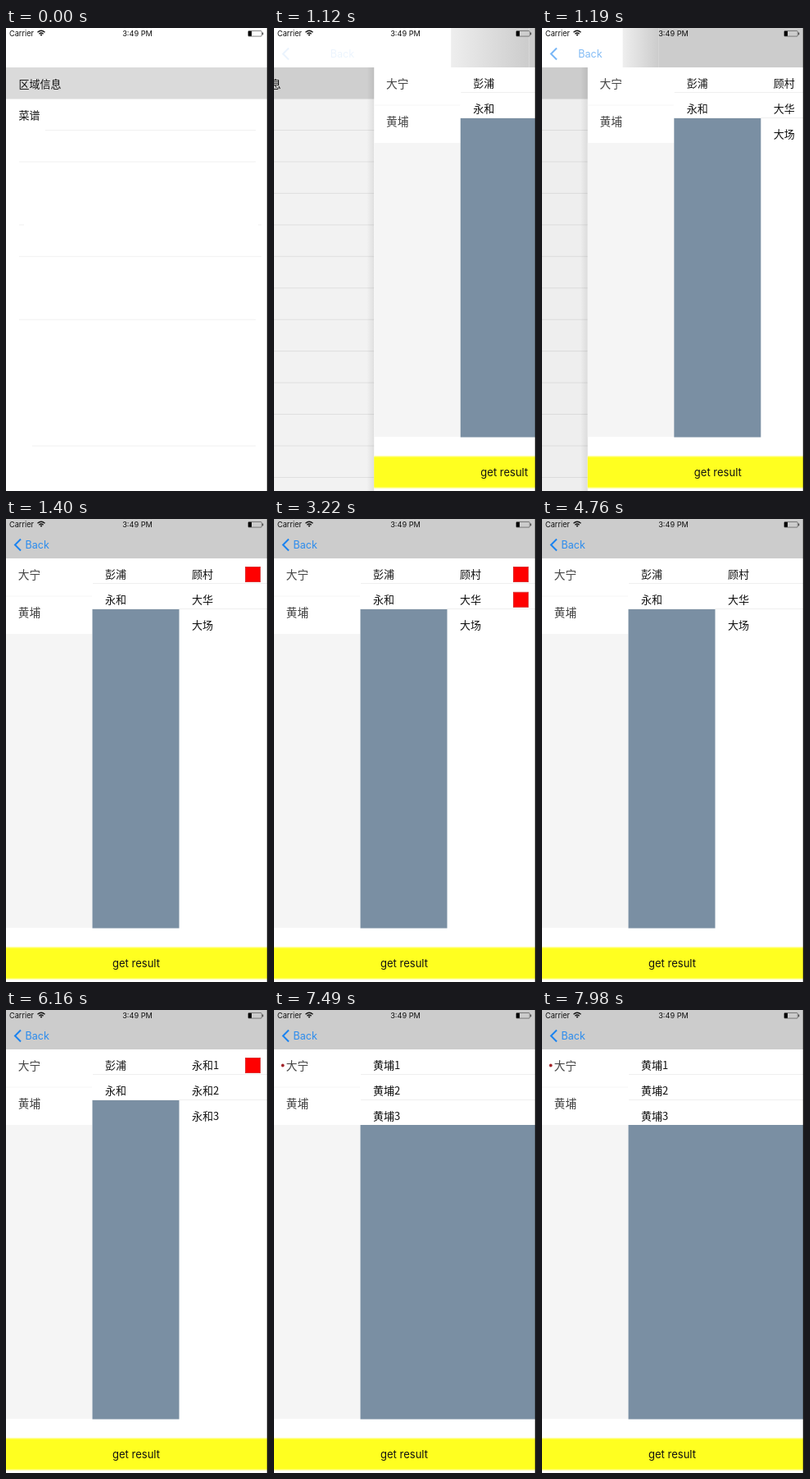
An HTML page that plays this animation: 320x564 px, repeating every 8000 ms.

```html
<!DOCTYPE html>
<html lang="zh-CN">
<head>
<meta charset="utf-8">
<style>
  html, body { margin: 0; width: 100%; height: 100%; overflow: hidden; background: #fff; }
  svg { display: block; width: 100%; height: 100%; }
  text { font: 13px "Noto Sans CJK SC", "Noto Sans CJK", sans-serif; fill: #111; }
  .latin { font-family: Inter, Roboto, sans-serif; }
  .status { font-size: 9.2px; }
</style>
</head>
<body>
<svg viewBox="0 0 320 564">
  <defs>
    <linearGradient id="barFade"><stop stop-color="#eee"/><stop offset="1" stop-color="#ccc"/></linearGradient>
    <linearGradient id="edgeShade"><stop stop-opacity="0"/><stop offset="1" stop-opacity=".08"/></linearGradient>
  </defs>
  <rect width="320" height="564" fill="#fff"/>

  <g id="list">
    <rect y="48" width="320" height="38.5" fill="#dadada"/>
    <g id="restLines"></g>
    <g id="pushLines"></g>
    <text x="15.5" y="72.5" font-size="13.2">区域信息</text>
    <text x="15.5" y="111">菜谱</text>
    <rect id="dim" y="48" width="400" height="516" opacity="0"/>
  </g>

  <g id="page">
    <rect x="-9" y="48" width="9" height="516" fill="url(#edgeShade)"/>
    <rect y="48" width="320" height="516" fill="#fff"/>
    <rect y="140" width="105.5" height="358" fill="#f5f5f5"/>
    <path d="M0 94H105" stroke="#f6f6f6"/>
    <rect id="fill" x="105.5" fill="#7a8fa3"/>
    <path d="M106 78.5H320M106 109.5H320" stroke="#efefef"/>
    <g id="cells"></g>
    <circle id="dot" cx="10.7" cy="67.5" r="1.9" fill="#a3262c"/>
    <rect y="521" width="320" height="40" fill="#ffffa0"/>
    <rect y="522.5" width="320" height="37" fill="#ffff20"/>
    <text class="latin" x="159" y="546" text-anchor="middle">get result</text>
  </g>

  <rect id="barGradient" height="48" fill="url(#barFade)"/>
  <rect id="barSolid" height="48" fill="#ccc"/>
  <g id="back">
    <path id="chevron" d="M18 24.5L11 31.5L18 38.5" fill="none" stroke="#1a83f0" stroke-width="2"/>
    <text id="backLabel" class="latin" x="23.5" y="36" style="font-size:12.6px;fill:#2b8cee">Back</text>
  </g>

  <text class="latin status" x="4" y="10.2">Carrier</text>
  <g fill="none" stroke="#111" stroke-width="1.4">
    <path d="M38.5 5.2Q43 1.2 47.5 5.2M40.4 7.2Q43 5 45.6 7.2"/>
    <path d="M42 8L43 9.4L44 8Z" fill="#111" stroke-width=".8"/>
  </g>
  <text class="latin status" x="160.5" y="10.2" text-anchor="middle" font-weight="600">3:49 PM</text>
  <rect x="295.7" y="3.5" width="16.6" height="6.6" rx="1" fill="none" stroke="#555" stroke-width=".7"/>
  <rect x="296" y="3.8" width="4" height="6" fill="#000"/>
  <rect x="313" y="5.5" width="1.2" height="2.8" fill="#444"/>
  <rect x="318.8" width="1.2" height="564" fill="#161616"/>
</svg>
<script>
const LOOP = 8000, STEP = 70, WIDTH = 319, ROW = 38.45;
const PUSH_START = 970, PUSH_TIME = 420;
const $ = id => document.getElementById(id);
const set = (id, attrs) => {
  for (const key in attrs) $(id).setAttribute(key, attrs[key]);
};
const line = (x1, x2, y, color) => `<path d="M${x1} ${y}H${x2}" stroke="${color}"/>`;

$('restLines').innerHTML = [[48, 305, 0], [16, 305, 1], [16, 22, 3], [308, 312, 3],
  [16, 312, 4], [16, 305, 6], [32, 305, 10]]
  .map(([a, b, row]) => line(a, b, 124.5 + row * ROW, '#f0f0f0')).join('');
$('pushLines').innerHTML = Array.from({ length: 12 },
  (_, row) => line(16, 320, 124.5 + row * ROW, '#ebebeb')).join('');

// Cubic ease (.25, .1, .25, 1), solved by bisection.
function ease(u) {
  let low = 0, high = 1;
  for (let i = 0; i < 20; i++) {
    const mid = (low + high) / 2;
    if (.75 * mid * (1 - mid) + mid ** 3 < u) low = mid; else high = mid;
  }
  const s = low, r = 1 - s;
  return .3 * r * r * s + 3 * r * s * s + s ** 3;
}

// Each step: start time, district, third-column place, ticked rows.
const steps = [
  [0, 'north', 'village', [0]],
  [2310, 'north', 'village', [0, 1]],
  [3710, 'north', 'village', [1]],
  [4060, 'north', 'village', []],
  [5390, 'north', 'numbered', []],
  [5880, 'north', 'numbered', [0]],
  [7210, 'south', '', []]
];
const numbered = name => [1, 2, 3].map(n => name + n);
const middle = { north: ['彭浦', '永和'], south: numbered('黄埔') };
const right = { village: ['顾村', '大华', '大场'], numbered: numbered('永和'), '': [] };
const column = (names, x) => names.map((name, i) =>
  `<text x="${x}" y="${72.3 + i * 30.8}">${name}</text>`).join('');

let shown;
function showCells(step) {
  if (step === shown) return;
  shown = step;
  const [, district, place, ticks] = step;
  const south = district === 'south', top = south ? 140 : 109.8;
  set('fill', { y: top, width: south ? 213.5 : 106, height: 498.5 - top });
  set('dot', { opacity: +south });
  $('cells').innerHTML =
    ['大宁', '黄埔'].map((name, i) =>
      `<text x="14.7" y="${72.5 + i * 46}" style="font-size:13.7px;fill:#444">${name}</text>`).join('') +
    column(middle[district], 121) + column(right[place], 227) +
    ticks.map(i => `<rect x="292.5" y="${58.5 + i * 30.8}" width="18" height="18" fill="#f00" stroke="#d33"/>`).join('');
}

function draw(now) {
  const t = Math.floor(now % LOOP / STEP) * STEP;
  const u = Math.min(1, Math.max(0, (t - PUSH_START) / PUSH_TIME));
  const p = u === 0 || u === 1 ? u : ease(u), rest = 1 - p;
  const move = x => `translate(${x})`;

  set('list', { transform: move(-.3 * WIDTH * p) });
  set('restLines', { opacity: +(u === 0) });
  set('pushLines', { opacity: +(u > 0) });
  set('dim', { opacity: .08 * p });
  set('page', { transform: move(WIDTH * rest), visibility: u ? 'visible' : 'hidden' });

  const fadeStart = Math.min(320, 564 * rest), fadeEnd = 813 * rest;
  set('barGradient', { x: fadeStart, width: fadeEnd - fadeStart });
  set('barSolid', { x: fadeEnd, width: Math.max(0, 320 - fadeEnd) });
  set('back', { opacity: Math.max(0, (p - .58) / .42) });
  set('backLabel', { transform: move(118 * rest) });

  showCells(steps.findLast(([start]) => t >= start));
  requestAnimationFrame(tick);
}

const origin = performance.now();
function tick() { draw(performance.now() - origin); }
tick();
</script>
</body>
</html>
```
